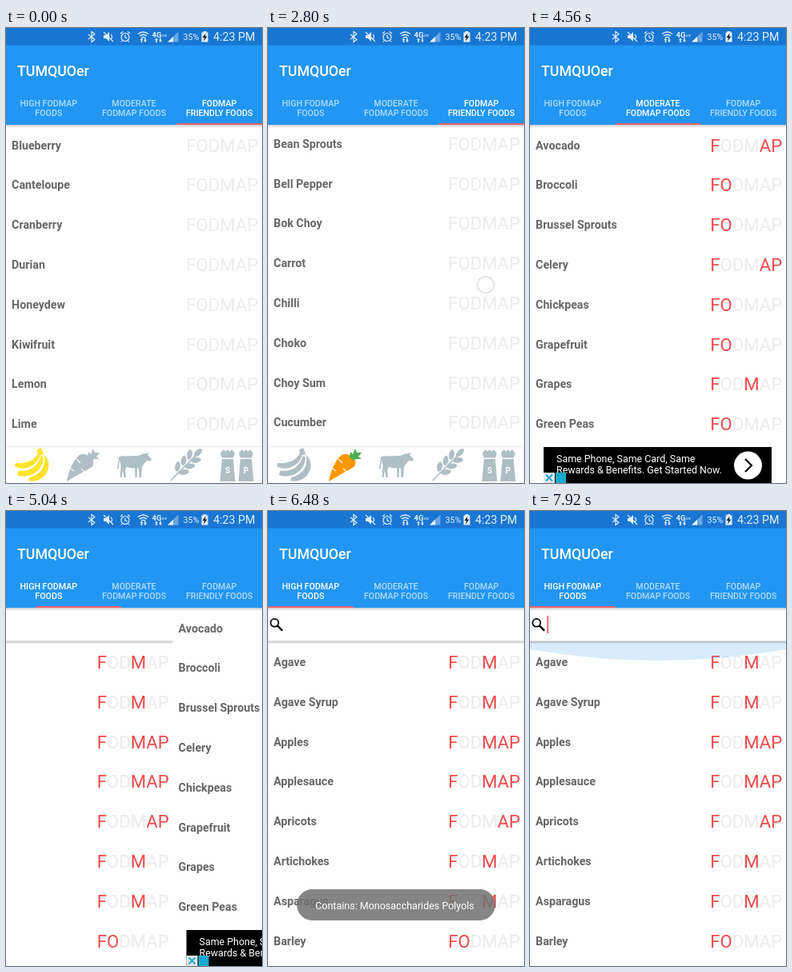
These frames come from a looping animation (320 px wide and 569 px high, 8000 ms). An HTML page with a canvas:

```html
<!DOCTYPE html>
<html lang="en">
<head>
<meta charset="utf-8">
<title>Food list app</title>
<style>
  html, body { margin: 0; width: 100%; height: 100%; overflow: hidden; background: #fefefe; }
  canvas { display: block; width: 100%; height: 100%; }
</style>
</head>
<body>
<canvas id="stage"></canvas>
<script>
const W = 320, H = 569, LOOP = 8000, ROW = 49.8;
const RED = '#ef4a4a', DIM = '#ececec', ICON = '#b0bec5', STATUS = '#e4f0fb';
const canvas = document.getElementById('stage');
const ctx = canvas.getContext('2d');
const dpr = window.devicePixelRatio || 1;
canvas.width = W * dpr;
canvas.height = H * dpr;

const fruits = 'Blueberry,Canteloupe,Cranberry,Durian,Honeydew,Kiwifruit,Lemon,Lime'.split(',');
const vegetables = ('Alfalfa,Bamboo Shoots,Bean Shoots,Bean Sprouts,Bell Pepper,Bok Choy,Carrot,' +
  'Chilli,Choko,Choy Sum,Cucumber,Eggplant,Endive').split(',');
const moderate = ('Avocado:FAP,Broccoli:FO,Brussel Sprouts:FO,Celery:FAP,Chickpeas:FO,' +
  'Grapefruit:FO,Grapes:FM,Green Peas:FO').split(',');
const high = ('Agave:FM,Agave Syrup:FM,Apples:FMAP,Applesauce:FMAP,Apricots:FAP,Artichokes:FM,' +
  'Asparagus:FM,Barley:FO,Beans:FO,Black Beans:FO,Black Eyed Peas:FO,Blackberries:FAP,' +
  'Boysenberries:FAP,Bran:FO').split(',');
const tabs = [['HIGH FODMAP', 'FOODS'], ['MODERATE', 'FODMAP FOODS'], ['FODMAP', 'FRIENDLY FOODS']];

// Eased value at time t through [time, value] keys.
function track(t, keys) {
  if (t <= keys[0][0]) return keys[0][1];
  for (let i = 1; i < keys.length; i++) {
    const [t0, a] = keys[i - 1], [t1, b] = keys[i];
    if (t < t1) {
      const k = (t - t0) / (t1 - t0);
      return a + (b - a) * k * k * (3 - 2 * k);
    }
  }
  return keys[keys.length - 1][1];
}

function text(str, x, y, size, color, weight = 400, align = 'left') {
  ctx.font = `${weight} ${size}px Roboto, sans-serif`;
  ctx.fillStyle = color;
  ctx.textAlign = align;
  ctx.fillText(str, x, y);
}

function rect(x, y, w, h, color) {
  ctx.fillStyle = color;
  ctx.fillRect(x, y, w, h);
}

function fill(path, color) {
  ctx.fillStyle = color;
  ctx.fill(new Path2D(path));
}

function line(path, color, width) {
  ctx.strokeStyle = color;
  ctx.lineWidth = width;
  ctx.stroke(new Path2D(path));
}

function circle(x, y, r, color) {
  ctx.beginPath();
  ctx.arc(x, y, r, 0, Math.PI * 2);
  ctx.fillStyle = color;
  ctx.fill();
}

function shadow(y, strength) {
  const g = ctx.createLinearGradient(0, y, 0, y + 4);
  g.addColorStop(0, `rgba(0,0,0,${strength})`);
  g.addColorStop(1, 'rgba(0,0,0,0)');
  rect(0, y, W, 4, g);
}

function list(items, firstY, scroll, top, bottom) {
  ctx.save();
  ctx.beginPath();
  ctx.rect(0, top, W, bottom - top);
  ctx.clip();
  items.forEach((item, i) => {
    const [name, code = ''] = item.split(':');
    const y = firstY + i * ROW - scroll;
    if (y < top - 20 || y > bottom + 20) return;
    text(name, 7.1, y + 5, 14.22, '#666', 700);
    let x = 225.2;
    for (const letter of 'FODMAP') {
      text(letter, x, y + 8, 22.2, code.includes(letter) ? RED : DIM);
      x += ctx.measureText(letter).width;
    }
  });
  ctx.restore();
}

function banana(color) {
  fill('M39 527L44 525L47 533L40 535Z', color);
  fill('M39 533C36 540 26 545 12 544L11 548C21 554 37 550 42.5 535Z', color);
  fill('M43.5 535C40 549 29 555 15 554L14 559C26 564 46 557 47 537Z', color);
  fill('M48 536C50 549 42 559 29 562L28 566C43 570 57 556 52.5 541C51 537 48 534 46 532Z', color);
}

function carrot(body, leaf) {
  fill('M76 567C78 556 83 541 92 534C97 531 103 534 107 538C111 543 110 548 104 551C94 556 85 562 76 567Z', body);
  fill('M102 537L103 530L106 533L109 526L111 531L117 531L113 536L117 539L110 539L107 541Z', leaf);
  line('M88 539L93 544M98 555L94 551M81 551L85 554', '#fff', 1.1);
}

function cow() {
  fill('M141 537C143 535 146 535 149 535.5L163 535C167 535 169 533 172 533L170 531.5L174 532.5' +
    'L179 531L177 534L182 539L181 541.5L176 541C173 543 172 546 170 549L169 562H166.5L166 551' +
    'L164 550L163.5 562H161.5L161 550C157 551 154 550 151 548.5L149 553L150 562H147.5L146 553' +
    'L144.5 562H142.5L143.5 550C144 545 142 542 142 539L141 550L139 552Z', ICON);
}

function grain(x, y, angle) {
  ctx.beginPath();
  ctx.ellipse(x, y, 6.3, 3.3, angle, 0, Math.PI * 2);
  ctx.fillStyle = ICON;
  ctx.fill();
}

function wheat() {
  line('M206 566C212 559 222 550 237 535', ICON, 1.8);
  for (let i = 0; i < 3; i++) {
    const x = 215 + i * 7.5, y = 555 - i * 7.5;
    grain(x - 0.5, y - 6.5, -1.4);
    grain(x + 7.5, y + 0.5, -0.17);
  }
  grain(240, 531, -0.8);
}

function shaker(x, letter) {
  ctx.save();
  ctx.translate(x, 0);
  [5, 10, 15].forEach(cx => circle(cx, 530, 2.2, ICON));
  fill('M1.5 530H18.5V534L17 537.5H3L1.5 534Z', ICON);
  fill('M3 539H17L19.5 567H0.5Z', ICON);
  text(letter, 10, 557, 10, '#fff', 700, 'center');
  ctx.restore();
}

function friendlyPage(t) {
  const onVegetables = t >= 1760;
  list(onVegetables ? vegetables : fruits, 146.5, vegetableScroll(t), 121, 523);
  rect(0, 523, W, 46, '#fefefe');
  rect(0, 523, W, 1, '#ececec');
  banana(onVegetables ? ICON : '#ffe42d');
  carrot(onVegetables ? '#ff9800' : ICON, onVegetables ? '#4caf50' : ICON);
  cow();
  wheat();
  shaker(267, 'S');
  shaker(290, 'P');
}

function moderatePage() {
  list(moderate, 146.5, 0, 121, 523);
  rect(17, 524, 285, 45, '#000');
  text('Same Phone, Same Card, Same', 33, 543, 12.45, '#fff');
  text('Rewards & Benefits. Get Started Now.', 33, 557, 12.45, '#fff');
  circle(272.5, 547, 17.5, '#fff');
  line('M269 539L277 547L269 555', '#000', 2.2);
  rect(17, 556, 14, 13, '#e3e6e8');
  line('M20 558.5L28 566.5M28 558.5L20 566.5', '#18a9cf', 1.8);
  rect(32, 556, 13, 13, '#18a9cf');
}

function highPage(t) {
  list(high, 189, highScroll(t), 163, H);
  const glow = track(t, [[7720, 0], [7920, 1]]);
  if (glow) {
    fill(`M0 163V${163 + 10 * glow}Q160 ${163 + 38 * glow} 320 ${163 + 10 * glow}V163Z`,
      'rgba(33,150,243,.17)');
  }
  rect(0, 121, W, 42, '#fefefe');
  shadow(162.5, 0.24);
  ctx.beginPath();
  ctx.arc(8.2, 139.8, 4.9, 0, Math.PI * 2);
  ctx.strokeStyle = '#000';
  ctx.lineWidth = 1.8;
  ctx.stroke();
  line('M11.8 143.4L18 149.6', '#000', 2.4);
  if (t >= 5960 && (t - 5960) % 960 < 480) rect(21.3, 131, 1.8, 22, '#f06060');
}

function statusBar() {
  rect(0, 0, W, 21.5, '#1976d2');
  line('M103 8L111 14.5L107 17.5V4.5L111 7.5L103 14', STATUS, 1.2);
  fill('M122 9H125L129 5V17L125 13H122Z', STATUS);
  line('M122 5L134 17M131 8C133 10 133 12 131.5 13.5', STATUS, 1.2);
  ctx.beginPath();
  ctx.arc(149, 11.5, 5, 0, Math.PI * 2);
  ctx.stroke();
  line('M149 8.5V11.8L151.5 13M143 7L146 4.5M152 4.5L155 7M145 16L143.8 17.5M153 16L154.2 17.5', STATUS, 1.2);
  line('M165 7.5Q171.5 2.5 178 7.5M167 10Q171.5 6.5 176 10M169 12.3Q171.5 10.5 174 12.3', STATUS, 1.4);
  fill('M167.5 15L169.5 12.5L171.5 15H170.3V18H168.7V15ZM172 15.5H173.2V12.5H174.8V15.5H176L174 18Z', STATUS);
  text('4G', 182.5, 11.5, 9.5, STATUS, 700);
  text('LTE', 195, 11, 3.5, STATUS, 700);
  fill('M186 15L188 12.5L190 15H188.8V18H187.2V15ZM191 15.5H192.2V12.5H193.8V15.5H195L193 18Z', STATUS);
  fill('M202 17.5L215.5 4.5V17.5Z', 'rgba(228,240,251,.4)');
  fill('M202 17.5L209 10.8V17.5Z', STATUS);
  text('35%', 221.5, 15.2, 10.67, STATUS);
  rect(246.5, 4, 4, 2, STATUS);
  rect(244.5, 5.5, 8, 12, STATUS);
  fill('M249.5 6.5L245.5 12H248L247 16.5L251.5 10.5H249Z', '#123');
  text('4:23 PM', 259, 16.3, 14.22, STATUS);
}

function header(position, t) {
  rect(0, 0, W, 121, '#2196f3');
  statusBar();
  text('TUMQUOer', 14, 60.3, 17.78, '#fff', 500);
  const selected = t < 4320 ? 2 : t < 5000 ? 1 : 0;
  tabs.forEach((lines, i) => lines.forEach((label, n) =>
    text(label, W * (i + 0.5) / 3, 97.7 + n * 12.4, 10.67,
      i === selected ? '#fff' : 'rgba(255,255,255,.66)', 500, 'center')));
  rect(position * W / 3, 119.2, W / 3, 1.8, '#ff5f5f');
  shadow(121, 0.2);
}

function toast(t) {
  const alpha = track(t, [[5980, 0], [6180, 1], [7460, 1], [7680, 0]]);
  if (!alpha) return;
  ctx.globalAlpha = alpha;
  ctx.beginPath();
  ctx.roundRect(36, 473, 248, 39, 19.5);
  ctx.fillStyle = 'rgba(112,112,112,.85)';
  ctx.fill();
  text('Contains: Monosaccharides Polyols', 158.5, 497.5, 12.5, '#fff', 400, 'center');
  ctx.globalAlpha = 1;
}

function touch(t, from, to, x, y) {
  if (t < from || t >= to) return;
  circle(x, y, 10.3, 'rgba(255,255,255,.6)');
  ctx.strokeStyle = 'rgba(110,120,160,.24)';
  ctx.lineWidth = 1.5;
  ctx.stroke();
}

const vegetableScroll = t => track(t, [[2240, 0], [2800, 151], [3000, 175], [3520, 21.5]]);
const highScroll = t => track(t, [[6880, 0], [7280, 231], [7400, 250], [7740, 0]]);
const pagePosition = t => track(t, [[4080, 2], [4480, 1], [4800, 1], [5200, 0]]);

function draw(t) {
  const position = pagePosition(t);
  ctx.setTransform(canvas.width / W, 0, 0, canvas.height / H, 0, 0);
  rect(0, 0, W, H, '#fefefe');
  [highPage, moderatePage, friendlyPage].forEach((page, i) => {
    const x = (i - position) * W;
    if (Math.abs(x) >= W) return;
    ctx.save();
    ctx.translate(x, 0);
    page(t);
    ctx.restore();
  });
  header(position, t);
  toast(t);
  touch(t, 1680, 1840, 97, 547);
  touch(t, 2240, 3520, 272, 472 - vegetableScroll(t));
  touch(t, 5680, 6000, 160, 286);
  touch(t, 6880, 7720, 240, 504 - highScroll(t));
}

function frame() {
  draw(performance.now() % LOOP);
  requestAnimationFrame(frame);
}
frame();
</script>
</body>
</html>
```
